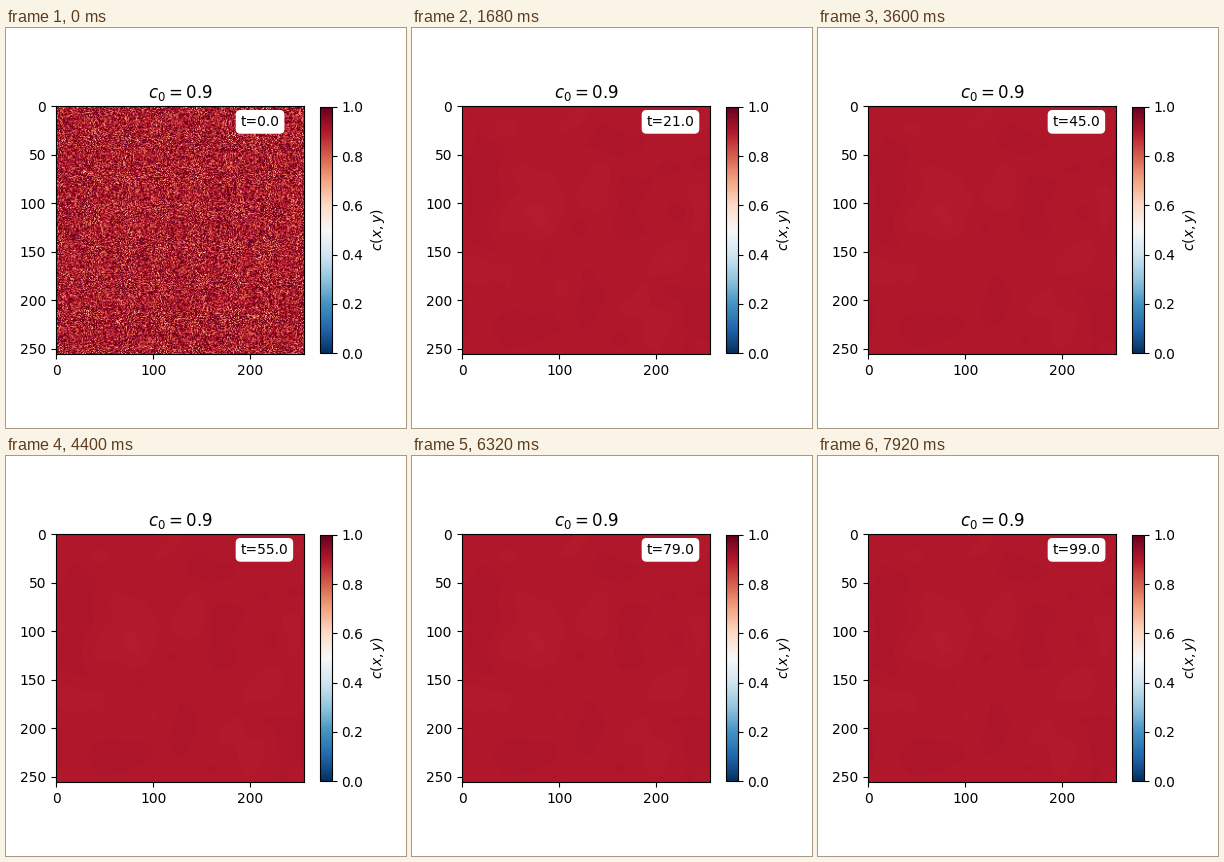
Recreate the animation shown at these times as a matplotlib script. Size 400x400 px, loop 7960 ms.

```python
import numpy as np
import matplotlib.pyplot as plt
from matplotlib.animation import FuncAnimation

# Cahn-Hilliard equation, semi-implicit spectral scheme
N = 256
L = 64 * np.pi
DT = 0.1
W, M, KAPPA = 2.0, 1.0, 0.5
C0, NOISE = 0.9, 0.1
FRAMES, STRIDE = 199, 5
RELAXED = 50  # the field is uniform from here on

ky = 2 * np.pi * np.fft.fftfreq(N, d=L / N)[:, None]
kx = 2 * np.pi * np.fft.rfftfreq(N, d=L / N)[None, :]
k2 = kx**2 + ky**2
k_cut = np.abs(ky).max() * 2 / 3
dealias = (np.abs(kx) < k_cut) & (np.abs(ky) < k_cut)


def dfdc(c):
    return 2 * W * (c * (1 - c)**2 - (1 - c) * c**2)


def simulate():
    rng = np.random.default_rng(12345)
    c = C0 + NOISE * rng.standard_normal((N, N))
    c_hat = np.fft.rfft2(c)
    fields = [c]
    for step in range(1, RELAXED * STRIDE + 1):
        force = np.fft.rfft2(dfdc(c)) * dealias
        c_hat = (c_hat - DT * M * k2 * force) / (1 + DT * M * KAPPA * k2**2)
        c = np.fft.irfft2(c_hat, s=(N, N))
        if step % STRIDE == 0:
            fields.append(c)
    return fields


fields = simulate()

fig, ax = plt.subplots(figsize=(4, 4), dpi=100)
im = ax.imshow(fields[0], cmap='RdBu_r', vmin=0, vmax=1)
fig.colorbar(im, ax=ax, label='$c(x,y)$', shrink=0.8)
ax.set_title(f'$c_0={C0:.1f}$')
clock = ax.text(190, 20, 't=0.0',
                bbox=dict(boxstyle='round', ec='white', fc='white'))


def update(i):
    im.set_data(fields[min(i, RELAXED)])
    clock.set_text(f't={i * STRIDE * DT:.1f}')
    return im, clock


ani = FuncAnimation(fig, update, frames=FRAMES, interval=40,
                    repeat=True, repeat_delay=0)
plt.show()
```
